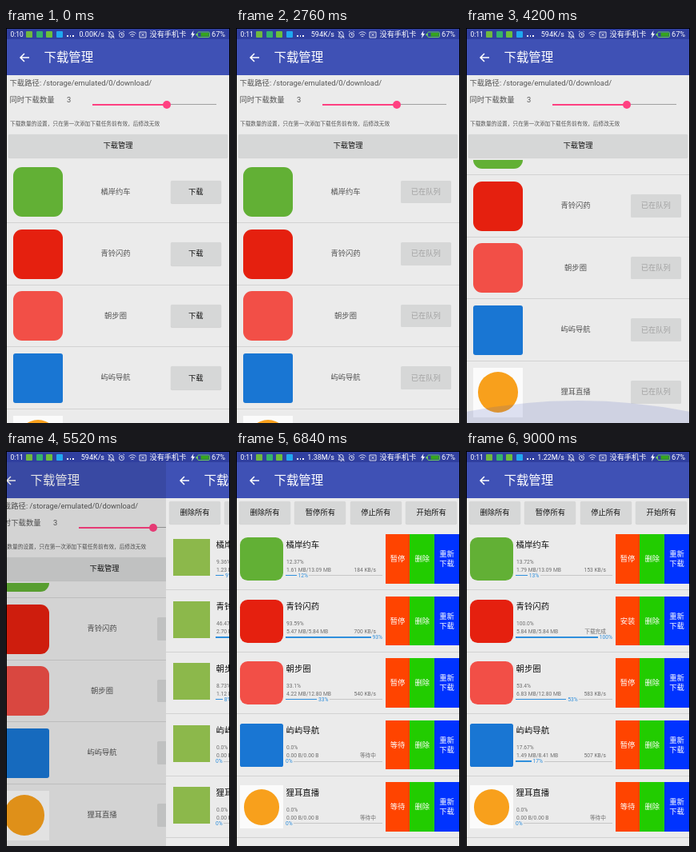
These frames come from a looping animation (280 by 494 pixels, 9.12 s). An HTML page:

```html
<!DOCTYPE html>
<html lang="zh-CN">
<head>
<meta charset="utf-8">
<title>下载管理</title>
<style>
html, body { margin: 0; width: 100%; height: 100%; overflow: hidden; background: #000; }
#stage { position: relative; width: 280px; height: 494px; overflow: hidden; background: #000;
  font-family: Roboto, "Noto Sans CJK SC", "Noto Sans CJK", sans-serif; }
#stage div, #stage svg { position: absolute; }
.t { line-height: 20px; height: 20px; white-space: pre; }
.btn { background: #d6d7d7; border-radius: 1.5px; box-shadow: 0 .5px 1px rgba(0,0,0,.2); }
.btn.off { box-shadow: none; }
.clip { overflow: hidden; }
</style>
</head>
<body>
<div id="stage"></div>
<script>
const LOOP = 9120, STEP = 120, PITCH = 77.65;
const BG = '#ebebeb', INK = '#151515', GREY = '#6e6e6e', BLUE = '#2f8fdc';
const apps = [
  { name: '橘岸约车', color: '#62b035', r: 11 },
  { name: '青铃闪药', color: '#e5200f', r: 11 },
  { name: '朝步圈', color: '#f24f47', r: 11 },
  { name: '屿屿导航', color: '#1976d3', r: 3 },
  { name: '狸耳直播', color: '#f8a01c', round: true }
];

// time, percent, megabytes, speed
const loads = [
  { total: '13.09 MB', keys: [[5520, 9.36, 1.23, 205], [6840, 12.37, 1.61, 184], [8280, 13.31, 1.74, 162], [9000, 13.72, 1.79, 153]] },
  { total: '5.84 MB', keys: [[5520, 46.47, 2.70, 640], [6840, 93.59, 5.47, 700], [7080, 100, 5.84, 700]] },
  { total: '12.80 MB', keys: [[5520, 8.73, 1.12, 420], [6840, 33.1, 4.22, 540], [8280, 46.26, 5.91, 606], [9000, 53.4, 6.83, 583]] },
  { total: '8.41 MB', keys: [[7440, 0, 0, 180], [8280, 9.2, .776, 392], [9000, 17.67, 1.49, 507]] },
  { total: '0.00 B', keys: [[LOOP, 0, 0, 0]] }
];
const queuedAt = [1200, 1560, 1920, 2280, 3720];
const slide = [[5400, 280], [5520, 200], [5640, 80], [5760, 25], [5880, 5], [6000, 0]];
const glowKeys = [[3960, 0], [4200, 1], [4800, 0]];
const toastKeys = [[7080, 0], [7320, 1], [8400, 1], [8760, 0]];
const speeds = [[0, '0.00K/s'], [1560, '594K/s'], [6480, '1.38M/s'], [7680, '1.22M/s']];

const stage = document.getElementById('stage');

function box(parent, x, y, w, h, css = '', cls = '') {
  const el = document.createElement('div');
  el.className = cls;
  el.style.cssText = `left:${x}px;top:${y}px;width:${w}px;height:${h}px;${css}`;
  parent.appendChild(el);
  return el;
}

function text(parent, x, cy, size, str, color = INK, align = 'left') {
  const left = align === 'center' ? x - 150 : align === 'right' ? x - 300 : x;
  const el = box(parent, left, cy - 10, 300, 20, `font-size:${size}px;color:${color};text-align:${align}`, 't');
  el.textContent = str;
  return el;
}

function svg(parent, x, y, w, h, body) {
  parent.insertAdjacentHTML('beforeend',
    `<svg style="left:${x}px;top:${y}px" width="${w}" height="${h}" viewBox="0 0 ${w} ${h}">${body}</svg>`);
  return parent.lastElementChild;
}

function button(parent, x, y, w, h, label) {
  const el = box(parent, x, y, w, h, '', 'btn');
  const caption = text(el, w / 2, h / 2, 9.3, label, INK, 'center');
  return { el, caption };
}

function appIcon(parent, app, x, y, size) {
  if (!app.round) return box(parent, x, y, size, size, `background:${app.color};border-radius:${app.r * size / 62}px`);
  const tile = box(parent, x, y, size, size, 'background:#fbfbfb');
  const d = size * .82, m = (size - d) / 2;
  box(tile, m, m, d, d, `background:${app.color};border-radius:50%`);
  return tile;
}

function page(parent) {
  const el = box(parent, 0, 0, 280, 494, `background:${BG}`, 'clip');
  box(el, 0, 0, 280, 59, 'background:#3f51b5');
  svg(el, 16, 31, 14, 12, '<path d="M13 6H2M7 1L2 6l5 5" fill="none" stroke="#fff" stroke-width="1.5"/>');
  text(el, 47.5, 37, 15.4, '下载管理', '#fff');
  return el;
}

const screen = box(stage, 1, 1, 278, 493, '', 'clip');
const root = box(screen, -1, -1, 280, 494);

// First page
const home = page(root);
text(home, 4.5, 69, 9.35, '下载路径: /storage/emulated/0/download/', '#555');
text(home, 4.5, 89.5, 9.35, '同时下载数量', '#555');
text(home, 76, 89.5, 9.3, '3', '#555');
box(home, 108, 95, 155, 1, 'background:#a0a0a0');
box(home, 108, 94.5, 93, 2, 'background:#ff4081');
box(home, 196, 90.5, 10, 10, 'background:#ff4081;border-radius:50%');
text(home, 5, 120, 6.7, '下载数量的设置，只在第一次添加下载任务前有效，后修改无效', '#555');
button(home, 3, 133, 274, 28.5, '下载管理');

const list = box(home, 0, 165, 280, 329, '', 'clip');
const listBody = box(list, 0, 0, 280, 390);
const getButtons = apps.map((app, i) => {
  const y = i * PITCH;
  appIcon(listBody, app, 9, y + 9, 62);
  text(listBody, 137, y + 39.5, 9.3, app.name, '#555', 'center');
  box(listBody, 0, y + 78, 280, 1, 'background:#d2d2d2');
  return button(listBody, 206, y + 25.5, 62.5, 28.5, '下载');
});
const glow = svg(home, 0, 434, 280, 60, '<path d="M0 60V46Q140 18 280 46V60Z" fill="#3f51b5" fill-opacity=".16"/>');
const shade = box(home, 0, 0, 280, 494, 'background:#000');

// Second page
const manager = page(root);
['删除所有', '暂停所有', '停止所有', '开始所有'].forEach((label, i) =>
  button(manager, 4 + i * 69.4, 63, 64, 28, label));

function action(parent, x, y, color, lines) {
  const el = box(parent, x, y, 31, 61.5, `background:${color}`);
  return lines.map((s, i) => text(el, 15.5, 31 + (i - (lines.length - 1) / 2) * 12, 9.3, s, '#fff', 'center'));
}

const rows = apps.map((app, i) => {
  const el = box(manager, 0, 104 + i * 77.6, 280, 62);
  const row = {
    icon: appIcon(el, app, 5, 4, 54),
    blank: box(el, 9, 6, 46, 46, 'background:#8cb84b'),
    percent: text(el, 63, 34.5, 6.7, '', GREY),
    size: text(el, 63, 44.5, 6.7, '', GREY),
    speed: text(el, 175, 44.5, 6.7, '', GREY, 'right'),
    done: box(el, 62, 50.7, 0, 1.5, `background:${BLUE}`),
    rest: box(el, 62, 51, 0, 1, 'background:#c6c6c6'),
    label: text(el, 62, 51.5, 6.7, '', BLUE)
  };
  text(el, 62.5, 13.5, 10.4, app.name, '#111');
  row.state = action(el, 186.5, 0, '#ff4400', [''])[0];
  action(el, 217.3, 0, '#22cc00', ['删除']);
  action(el, 248, 0, '#0033ff', ['重新', '下载']);
  box(el, 0, 69, 280, 1, 'background:#d2d2d2');
  return row;
});

const toast = box(root, 16, 404, 248, 41, 'background:rgba(72,72,72,.93);border-radius:2px');
text(toast, 11, 15, 7.9, '下载完成:/storage/emulated/0/download/', '#eee');
text(toast, 11, 26, 7.9, 'qinglingshanyao.apk', '#eee');

// Status bar
const bar = box(root, 0, 0, 280, 14, 'background:#303f9f');
const clock = text(bar, 5.5, 8, 8.4, '', '#fff');
const netSpeed = text(bar, 123, 8, 9, '', '#fff', 'right');
['#6fb83f', '#35b26b', '#6cbf3a', '#20a8f0'].forEach((c, i) =>
  box(bar, 25 + i * 12.6, 4, 8, 8, `background:${c};border-radius:1px`));
[76, 79.5, 83].forEach(x => box(bar, x, 9, 1.5, 1.5, 'background:#fff'));
svg(bar, 126, 3, 52, 11, `<g fill="none" stroke="#fff" stroke-width=".8">
  <path d="M2 8h7L8 6.5V4a2.5 2.5 0 0 0-5 0v2.5ZM4.7 9.5h1.6M1.5 1l8 9"/>
  <circle cx="18.5" cy="5.7" r="3"/><path d="M18.5 3.8v2h1.5M15 2l1.5-1.2M22 2L20.5 .8"/>
  <path d="M27.5 3.8q4.5-4 9 0M29 5.8q3-2.5 6 0M30.6 7.7q1.4-1 2.8 0"/>
  <path d="M41 2h8v7h-8zM43.200 3.700l3.600 3.600M46.800 3.700l-3.600 3.600"/></g>`);
text(bar, 179.5, 8, 9.2, '没有手机卡', '#fff');
svg(bar, 230, 3, 26, 10, `<path d="M4.5 0L1 5.500h2L2 10l4-6H3.700z" fill="#fff"/>
  <rect x="9.500" y="2" width="15" height="6.500" rx="1.500" fill="none" stroke="#6fd35a" stroke-width=".9"/>
  <rect x="7.500" y="4" width="1.500" height="2.500" fill="#6fd35a"/>
  <rect x="13.500" y="3" width="10" height="4.500" fill="#35a51c"/>`);
text(bar, 257, 8, 9.2, '67%', '#fff');

function sample(keys, t, col = 1) {
  if (t <= keys[0][0]) return keys[0][col];
  for (let i = 1; i < keys.length; i++) {
    const a = keys[i - 1], b = keys[i];
    if (t <= b[0]) return a[col] + (b[col] - a[col]) * (t - a[0]) / (b[0] - a[0]);
  }
  return keys[keys.length - 1][col];
}

function snap(t) {
  if (t < 360) return 0;
  if (t < 1200) return 360;
  if (t >= 5040 && t < 5520) return 5040;
  return Math.floor(t / STEP) * STEP;
}

function percentText(p) {
  const n = +p.toFixed(2);
  return (Number.isInteger(n) ? n.toFixed(1) : n) + '%';
}

function drawLoad(row, load, t, i) {
  const p = sample(load.keys, t), mb = sample(load.keys, t, 2);
  const waiting = i === 4 || (i === 3 && t < 7440), finished = p >= 100;
  const got = mb === 0 ? '0.00 B' : mb < 1 ? Math.round(mb * 1000) + ' KB' : mb.toFixed(2) + ' MB';
  row.percent.textContent = percentText(p);
  row.size.textContent = got + '/' + (waiting ? '0.00 B' : load.total);
  row.speed.textContent = waiting ? '等待中' : finished ? '下载完成' : Math.round(sample(load.keys, t, 3)) + ' KB/s';
  row.state.textContent = waiting ? '等待' : finished ? '安装' : '暂停';

  const n = Math.floor(p), label = n + '%';
  const w = ((label.length - 1) * .562 + .732) * 6.7;
  const x = n ? Math.min(63 + 1.21 * n, 183 - w) : 62;
  const end = x + w + 1.5;
  row.label.textContent = label;
  row.label.style.left = x + 'px';
  row.done.style.width = Math.max(0, x - 64) + 'px';
  row.rest.style.left = end + 'px';
  row.rest.style.width = Math.max(0, 183 - end) + 'px';
  const loaded = t >= 5760;
  row.icon.style.visibility = loaded ? 'visible' : 'hidden';
  row.blank.style.visibility = loaded ? 'hidden' : 'visible';
}

function draw(t) {
  clock.textContent = t < 1200 ? '0:10' : '0:11';
  netSpeed.textContent = speeds.filter(s => s[0] <= t).pop()[1];

  getButtons.forEach((b, i) => {
    const queued = t >= queuedAt[i];
    b.caption.textContent = queued ? '已在队列' : '下载';
    b.caption.style.color = queued ? '#a2a2a2' : INK;
    b.el.classList.toggle('off', queued);
  });
  const u = Math.min(1, Math.max(0, (t - 3000) / 600));
  listBody.style.top = -60 * (1 - (1 - u) ** 2) + 'px';
  glow.style.opacity = sample(glowKeys, t);

  const x = sample(slide, t), moved = 280 - x;
  manager.style.left = x + 'px';
  home.style.left = -moved * .2125 + 'px';
  shade.style.opacity = moved / 280 * .35;
  rows.forEach((row, i) => drawLoad(row, loads[i], t, i));
  toast.style.opacity = sample(toastKeys, t);
}

const start = performance.now();
let last = -1;
function frame() {
  const t = snap((performance.now() - start) % LOOP);
  if (t !== last) draw(last = t);
  requestAnimationFrame(frame);
}
frame();
</script>
</body>
</html>
```
